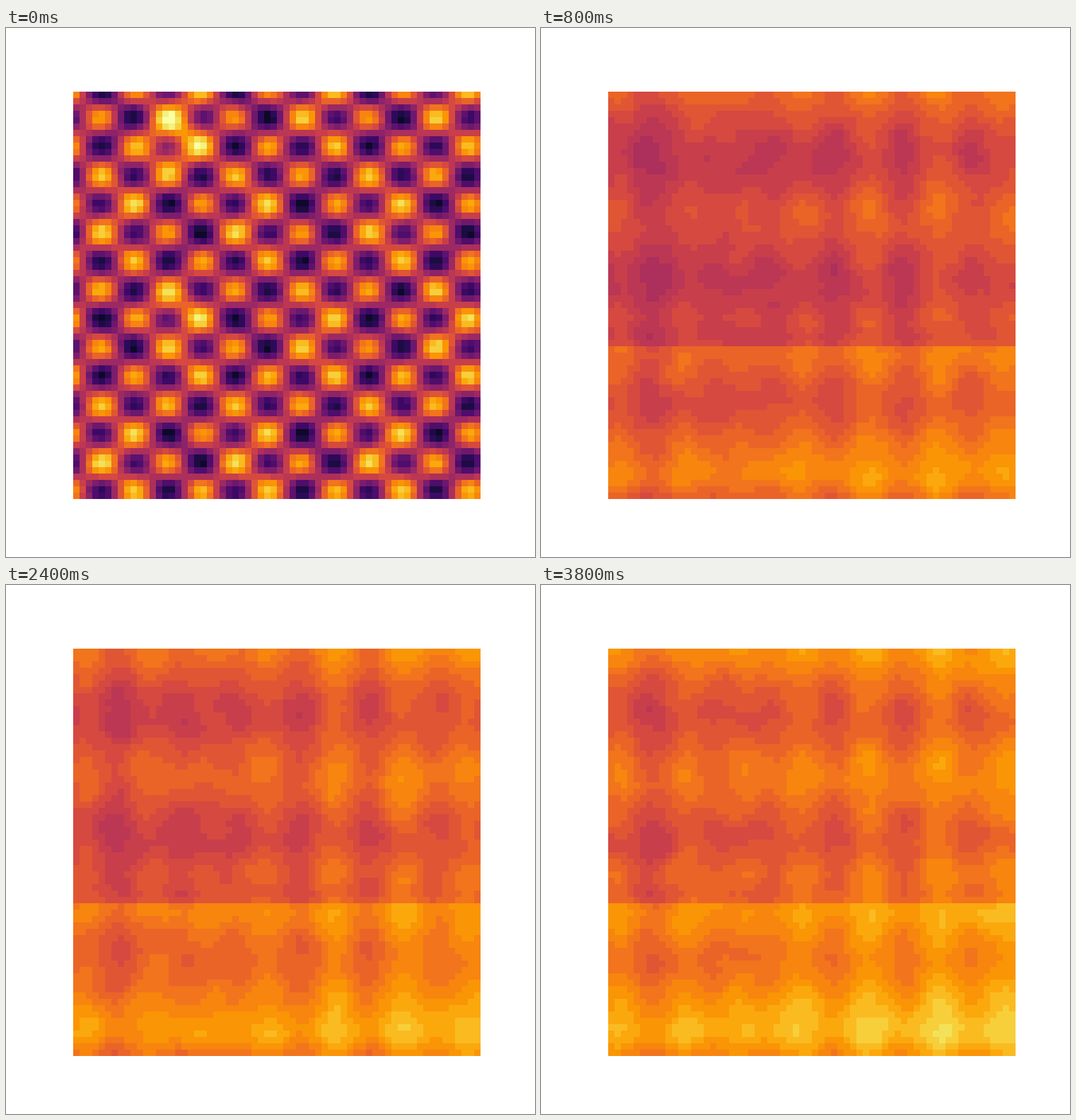
These frames come from a looping animation (748 px wide and 748 px high, 4 s). A matplotlib script:

```python
import numpy as np
import matplotlib.pyplot as plt
from matplotlib.animation import FuncAnimation

SIZE, FRAMES, STEP_MS = 64, 20, 200
LEFT, TOP, CELL = 95.4, 89.8, 9
LEVELS = 26


def wave(v, peak, period):
    return np.cos(2 * np.pi * (v - peak) / period)


def bell(v, centre, width):
    return np.exp(-((v - centre) / width) ** 2)


def smooth(a, passes=2):
    for _ in range(passes):
        for axis in (0, 1):
            a = (np.roll(a, 1, axis) + a + np.roll(a, -1, axis)) / 3
    return a / a.std()


# cell centres in stage pixels
centre = (np.arange(SIZE) + .5) * CELL
X, Y = np.meshgrid(LEFT + centre, TOP + centre)

# resting relief: darker left, brighter lower part, crossed by bands
cols = (.09 * (X - LEFT) / (SIZE * CELL) - .045
        + .025 * wave(X, 647, 90) + .02 * wave(X, 345, 115))
rows = (np.where(Y < 446, -.04, .045) + .045 * wave(Y, 97, 172)
        + .04 * bell(Y, 90, 25) - .05 * bell(Y, 435, 20) + .05 * bell(Y, 635, 25))
relief = cols + rows

# starting pattern: checkerboard with a slow beat linking diagonal blobs
check = wave(X, 135, 94.6) * wave(Y, 127, 81.2)
check += .25 * wave(X, 158, 189) * wave(Y, 269, 325)
spots = bell(X, 238, 45) * (bell(Y, 160, 45) + .5 * bell(Y, 392, 30))

rng = np.random.default_rng(7)
grain_a, grain_b = (smooth(rng.standard_normal((SIZE, SIZE))) for _ in range(2))


def field(n):
    start = np.exp(-n / 1.05)
    v = .585 + .0062 * n - .095 * start
    v = v + (1 + .005 * n - .88 * start) * relief
    v = v + (.008 + .36 * np.exp(-1.6 * n)) * check + .27 * np.exp(-.5 * n) * spots
    v = v + .01 * (grain_a * np.cos(.5 * n) + grain_b * np.sin(.5 * n))
    return np.round(np.clip(v, 0, 1) * LEVELS) / LEVELS


fig, ax = plt.subplots(figsize=(7.48, 7.48), dpi=100)
ax.axis("off")
image = ax.imshow(field(0), cmap="inferno", vmin=0, vmax=1, interpolation="nearest")


def update(n):
    image.set_data(field(n))
    return [image]


anim = FuncAnimation(fig, update, frames=FRAMES, interval=STEP_MS, repeat=True)
plt.show()
```
